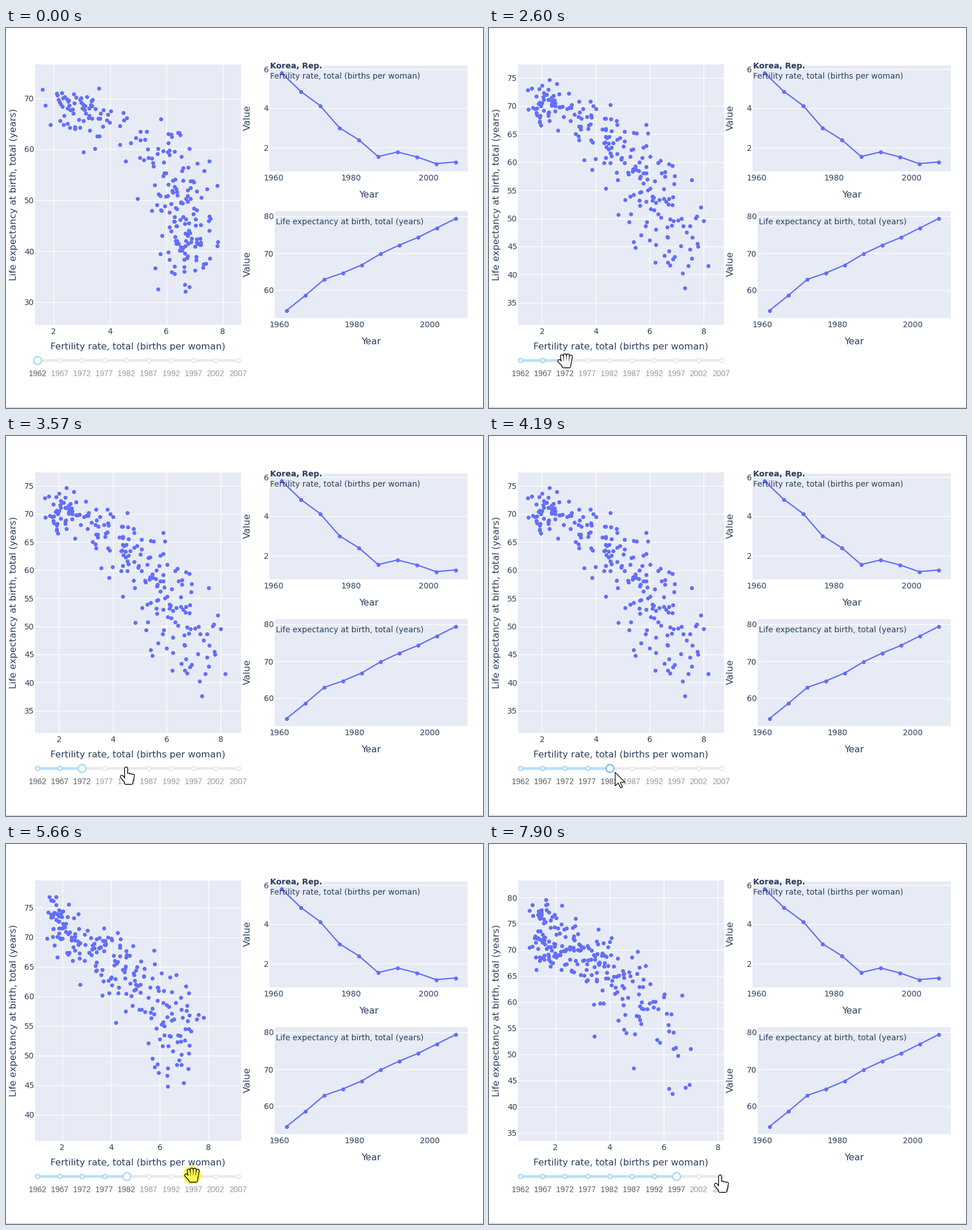
Animation, 838 px wide and 668 px high, one loop 8 s. Source, as a matplotlib script:

```python
import matplotlib.pyplot as plt
import numpy as np
from matplotlib.animation import FuncAnimation
from matplotlib.patches import Circle, Polygon, Rectangle

W, H, DPI = 838, 668, 64
LOOP, STEP = 8000, 50
PT = 72 / DPI
INK, PANEL, DOT = "#2a3f5f", "#E6EBF5", "#636EFA"
RAIL, TRACK, RING, RING_HOVER = "#e9e9e9", "#b9e0fb", "#a0d8fa", "#6fbcf0"
YELLOW = "#fff950"
FERTILITY = "Fertility rate, total (births per woman)"
LIFE = "Life expectancy at birth, total (years)"

fig = plt.figure(figsize=(W / DPI, H / DPI), dpi=DPI, facecolor="white")
ax = fig.add_axes([0, 0, 1, 1])
ax.set_xlim(0, W)
ax.set_ylim(H, 0)
ax.axis("off")


def text(x, y, s, size=13.9, ha="center", va="center_baseline",
         font="DejaVu Sans", **kw):
    return ax.text(x, y, s, fontsize=size * PT, ha=ha, va=va, color=INK,
                   family=font, **kw)


def side_title(x, y, s):
    text(x, y, s, 16.2, va="center", rotation=90)


def line(xs, ys, color="white", width=1.3, **kw):
    return ax.plot(xs, ys, color=color, lw=width * PT, **kw)[0]


def dots(xs, ys, size=7.0, face=DOT, edge=None, edge_width=0, z=3):
    return ax.plot(xs, ys, "o", ms=size * PT, mfc=face, mec=edge or face,
                   mew=edge_width * PT, zorder=z)[0]


def panel(x0, y0, x1, y1):
    ax.add_patch(Rectangle((x0, y0), x1 - x0, y1 - y0, fc=PANEL, lw=0, zorder=0))


def cloud(spine, seed, count=230):
    """Points strewn along a spine of (x, y, x radius, y radius) knots."""
    rng = np.random.default_rng(seed)
    knots = np.array(spine)
    u = np.linspace(0, len(knots) - 1, count)
    seg, s = np.floor(u), u % 1
    u = seg + s * s * (3 - 2 * s)  # crowd the points near the knots
    x, y, rx, ry = (np.interp(u, range(len(knots)), col) for col in knots.T)
    dx, dy = np.clip(rng.normal(0, 0.52, (2, count)), -1.2, 1.2)
    return x + rx * dx, y + ry * dy


def snapshot(spine, seed, x2, dx, y_top, dy, labels):
    """Grid, tick labels and points of one year, hidden until needed."""
    group = [dots(*cloud(spine, seed))]
    for k in range(4):
        x = x2 + k * dx
        group += [line([x, x], [63.5, 521.5], zorder=1), text(x, 532, 2 + 2 * k)]
    for k, label in enumerate(labels):
        y = y_top + k * dy
        group += [line([51, 413], [y, y], zorder=1),
                  text(49.5, y, label, ha="right")]
    return group


def trend(box, x_ends, ys, top_tick, tick_step, labels, x1960, x_step):
    """One of the small line charts on the right."""
    x0, y0, x1, y1 = box
    panel(*box)
    for k, label in enumerate(labels):
        y = top_tick + k * tick_step
        line([x0, x1], [y, y], zorder=1)
        text(x0 - 1.5, y, label, ha="right")
    for k in range(3):
        text(x1960 + k * x_step, y1 + 10.5, 1960 + 20 * k)
    text((x0 + x1) / 2, y1 + 40.5, "Year", 16.2)
    side_title(424.5, (y0 + y1) / 2 - 1, "Value")
    xs = np.linspace(*x_ends, len(ys))
    line(xs, ys, DOT, 2.3, zorder=2)
    dots(xs, ys)


panel(51, 63.5, 413, 521.5)
text(231.5, 558.5, FERTILITY, 16.2)
side_title(14, 292.5, LIFE)
snapshots = [
    snapshot([(100, 128, 30, 22), (140, 145, 50, 45), (285, 225, 55, 50),
              (305, 300, 55, 40), (315, 360, 50, 40), (318, 430, 50, 50)],
             3, 83.5, 99, 123.5, 89.5, range(70, 20, -10)),
    snapshot([(98, 125, 25, 30), (115, 140, 45, 45), (215, 190, 50, 45),
              (255, 245, 65, 50), (305, 310, 60, 50), (320, 405, 55, 55)],
             5, 93, 94.7, 87.5, 49.4, range(75, 30, -5)),
    snapshot([(86, 118, 15, 28), (108, 160, 28, 45), (175, 190, 45, 50),
              (225, 240, 55, 60), (290, 295, 50, 60), (310, 395, 50, 65)],
             7, 98.5, 85.8, 111.5, 52, range(75, 35, -5)),
    snapshot([(97, 118, 24, 26), (97, 180, 28, 42), (148, 185, 35, 45),
              (185, 205, 50, 50), (245, 260, 50, 65), (320, 360, 65, 75)],
             9, 116.5, 95.3, 94, 45.95, range(80, 30, -5)),
]

trend((463, 66, 811, 252), (484, 789.5),
      [79, 111.5, 136.5, 175.5, 196.5, 226, 218, 226.5, 238.5, 235.5],
      72, 69, (6, 4, 2), 470.5, 135.8)
trend((472, 321.5, 811, 510), (493, 790),
      [496.5, 470, 442, 430.5, 416.5, 397, 381.5, 368, 351.5, 335],
      331, 65, (80, 70, 60), 480, 132)
text(464.5, 65.5, "Korea, Rep.", ha="left", weight="bold", zorder=5)
text(464.5, 83.5, FERTILITY, ha="left", zorder=5)
text(474, 339, LIFE, ha="left", zorder=5)
line([0, W], [667, 667], "#d4d4d4", 1.5)

# Slider
STOPS = np.linspace(55, 407.5, 10)
RAIL_Y = 584
line(STOPS[[0, -1]], [RAIL_Y] * 2, RAIL, 4.6, zorder=4, solid_capstyle="round")
track = line([], [], TRACK, 4.6, zorder=4.1, solid_capstyle="round")
stops = [dots([x], [RAIL_Y], 7.2, "white", RAIL, 2.2, 4.2) for x in STOPS]
handle = dots([], [], 13.6, "white", RING, 2.2, 4.3)
years = [text(x, 606.5, 1962 + 5 * k, font="Liberation Sans")
         for k, x in enumerate(STOPS)]


def hand(tips, bases, thumb):
    """Fingers as strokes from tip to base, parted by gaps, plus a thumb."""
    gap = (np.nan, np.nan)
    strokes = [p for tip, base in zip(tips, bases) for p in (tip, base, gap)]
    return np.array(strokes + list(thumb))


# Mouse pointers, relative to the hot spot
ARROW = np.array([(0, 0), (0, 24), (5.5, 19), (9.5, 27.5), (13, 26), (9, 18),
                  (17, 17.5)])
HANDS = {
    "point": hand([(4 * k, 12 + k if k else 2.5) for k in range(4)],
                  [(3 * k, 28) for k in range(4)], [(0, 26), (-7.5, 17)]),
    "grab": hand([(-6 + 5.3 * k, -10.5 + 1.8 * abs(k - 1.4)) for k in range(4)],
                 [(-3 + 3.2 * k, 10) for k in range(4)], [(-2, 9), (-10.5, 0.5)]),
}
glow = ax.add_patch(Circle((0, 0), 16, fc=YELLOW, lw=0, zorder=8))
arrow = ax.add_patch(Polygon(ARROW, fc="white", ec="black", lw=1.2 * PT, zorder=9))
hand_edge = line([], [], "black", 6.6, zorder=9, solid_capstyle="round")
hand_fill = line([], [], "white", 4, zorder=9.1, solid_capstyle="round")

PATH = [(1190, 156, 655), (1730, 133, 578), (1850, 133, 578), (1960, 134, 585),
        (2640, 134, 585), (3430, 211, 582), (4110, 211, 582), (4820, 327, 582),
        (7100, 327, 582), (7900, 406, 582)]
POINTERS = [(0, None), (1190, "arrow"), (1970, "point"), (2200, "grab"),
            (2640, "arrow"), (3420, "point"), (3940, "grab"), (4130, "arrow"),
            (4800, "point"), (5660, "grab"), (7120, "arrow"), (7860, "point")]
SLIDER = [(0, 0), (2270, 2), (4000, 4), (5730, 7)]
SCATTER = [(0, 0), (2600, 1), (4350, 2), (5900, 3)]
CLICKS = [(2200, 2340), (3940, 4080), (5660, 5860)]


def current(schedule, t):
    return [value for start, value in schedule if start <= t][-1]


def pointer_at(t):
    """Straight moves; the long hops along the slider sag below it."""
    for (t0, x0, y0), (t1, x1, y1) in zip(PATH, PATH[1:]):
        if t < t1:
            s = np.clip((t - t0) / (t1 - t0), 0, 1)
            break
    else:
        s = 1
    sag = 32 * np.sin(np.pi * s) if x1 - x0 > 50 else 0
    return x0 + (x1 - x0) * s, y0 + (y1 - y0) * s + sag


def update(frame):
    t = frame * STEP + STEP / 2
    shown = current(SCATTER, t)
    for k, group in enumerate(snapshots):
        for artist in group:
            artist.set_visible(k == shown)

    x, y = pointer_at(t)
    kind = current(POINTERS, t)
    pressed = any(a <= t < b for a, b in CLICKS)
    glow.center = x, y
    glow.set_visible(pressed)
    arrow.set_xy(ARROW + (x, y))
    arrow.set_visible(kind == "arrow")
    for part in (hand_edge, hand_fill):
        part.set_visible(kind in HANDS)
        if kind in HANDS:
            part.set_data(*(HANDS[kind] + (x, y)).T)
    hand_fill.set_color(YELLOW if pressed else "white")

    value = current(SLIDER, t)
    hover = kind and np.hypot(x - STOPS[value], y - RAIL_Y) < 13
    track.set_data([STOPS[0], STOPS[value]], [RAIL_Y] * 2)
    handle.set_data([STOPS[value]], [RAIL_Y])
    handle.set_markeredgecolor(RING_HOVER if hover else RING)
    for k, (stop, year) in enumerate(zip(stops, years)):
        stop.set_markeredgecolor(RING if k <= value else RAIL)
        year.set_color("#5c5c5c" if k <= value else "#999999")
    return []


anim = FuncAnimation(fig, update, frames=LOOP // STEP, interval=STEP,
                     repeat=True, repeat_delay=0, blit=False)
plt.show()
```
